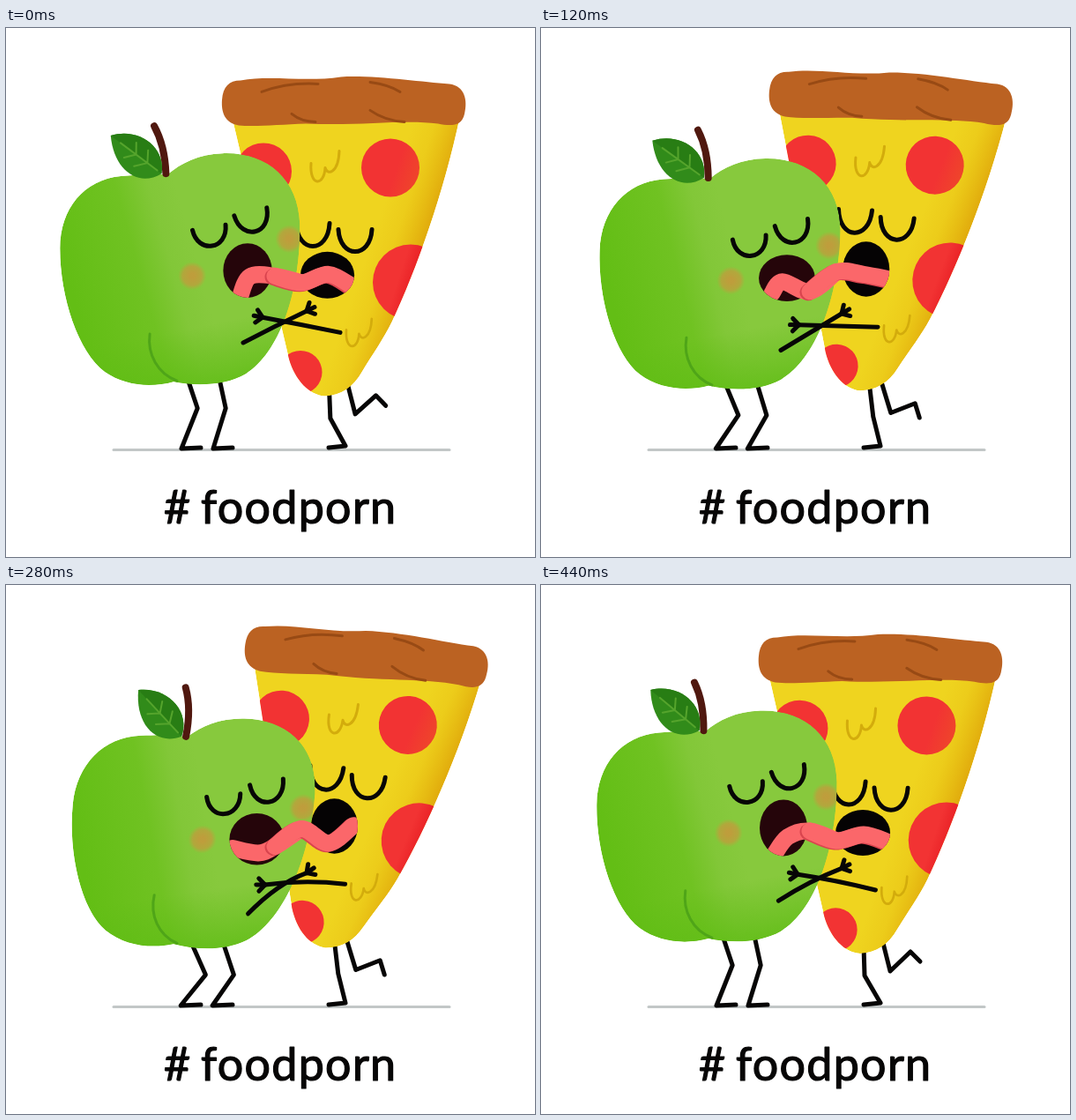
Recreate the animation shown at these times as an HTML page with a canvas. Size 600 by 600 pixels, loop 0.48 s.

```html
<!DOCTYPE html>
<html lang="en">
<head>
<meta charset="utf-8">
<title>Food hug</title>
<style>
  html, body { margin: 0; width: 100%; height: 100%; overflow: hidden; background: #fff; }
  canvas { display: block; }
</style>
</head>
<body>
<canvas id="stage" width="600" height="600"></canvas>
<script>
const ctx = document.getElementById('stage').getContext('2d');
const STEP_MS = 40, STEPS = 12;
const BLACK = '#070606', PINK = '#fb676a', FOLD = '#d9444e', RED = '#f23333';

let step = 0;

// Swings from 0 to 1 and back once per loop, reaching 1 at the given step.
const wave = peak => (1 + Math.cos((step - peak) / STEPS * 2 * Math.PI)) / 2;

const shapes = {
  apple: new Path2D('M183 166C165 165 150 166 130 168C88 172 61 205 61 250C61 305 82 368 112 390C135 406 165 408 190 401C215 406 248 406 272 392C310 368 334 300 333 222C331 170 295 140 245 142C218 143 198 153 183 166Z'),
  crease: new Path2D('M163 347C160 370 172 392 194 400'),
  stem: new Path2D('M0 0Q-1 -32 -13 -54'),
  leaf: new Path2D('M0 0C12 -29 46 -29 72 0C52 27 14 27 0 0Z'),
  leafHalf: new Path2D('M0 0C14 27 52 27 72 0Z'),
  veins: new Path2D('M6 0H58M20 0L28 12M20 0L30 -12M36 0L44 11M36 0L45 -11'),
  slice: new Path2D('M256 100L321 376C328 400 344 417 362 418C380 417 394 408 404 390C416 370 429 352 438 333C465 275 496 190 515 100Z'),
  crust: new Path2D('M266 60C300 54 340 62 380 56C420 54 470 62 503 64C520 66 524 82 520 98C517 112 505 112 490 109C450 104 400 112 340 109C310 110 282 113 264 111C248 108 244 96 245 82C246 67 253 60 266 60Z'),
  crustLines: new Path2D('M290 73Q320 62 354 64M413 62Q435 65 447 73M324 98Q335 107 351 107M413 94Q430 106 452 107'),
  squiggle: new Path2D('M0 0C-2 27 15 26 16 5C18 14 31 12 32 -14')
};

function stroke(path, color, width) {
  ctx.strokeStyle = color;
  ctx.lineWidth = width;
  ctx.stroke(path);
}

function fill(path, color) {
  ctx.fillStyle = color;
  ctx.fill(path);
}

function disc(x, y, rx, ry, color) {
  const path = new Path2D();
  path.ellipse(x, y, rx, ry, 0, 0, 7);
  fill(path, color);
}

function line(...coords) {
  const path = new Path2D();
  for (let i = 0; i < coords.length; i += 2) path.lineTo(coords[i], coords[i + 1]);
  stroke(path, BLACK, 5);
}

function layer(draw) {
  ctx.save();
  draw();
  ctx.restore();
}

function gradient(x0, y0, x1, y1, stops) {
  const g = ctx.createLinearGradient(x0, y0, x1, y1);
  stops.forEach(([at, color]) => g.addColorStop(at, color));
  return g;
}

function eye(x, y, depth, tilt) {
  layer(() => {
    ctx.translate(x, y);
    ctx.rotate(tilt);
    const d = depth / .75;
    stroke(new Path2D(`M-19 0C-17 ${d} 17 ${d} 19 0`), BLACK, 5);
  });
}

function cheek(x, y) {
  const g = ctx.createRadialGradient(x, y, 3, x, y, 16);
  g.addColorStop(0, 'rgba(200,150,60,.85)');
  g.addColorStop(.6, 'rgba(196,154,60,.7)');
  g.addColorStop(1, 'rgba(190,160,60,0)');
  disc(x, y, 16, 16, g);
}

// Smooth curve through [x, y] points.
function spline(points) {
  const path = new Path2D(), at = i => points[Math.max(0, Math.min(points.length - 1, i))];
  path.moveTo(...points[0]);
  for (let i = 0; i < points.length - 1; i++) {
    const a = at(i - 1), b = at(i), c = at(i + 1), d = at(i + 2);
    path.bezierCurveTo(b[0] + (c[0] - a[0]) / 6, b[1] + (c[1] - a[1]) / 6,
      c[0] - (d[0] - b[0]) / 6, c[1] - (d[1] - b[1]) / 6, ...c);
  }
  return path;
}

function drawLegs() {
  const u = wave(5.5), v = wave(5);
  for (const [hip, knee, foot] of [[206, 217, 199], [242, 249, 235]])
    line(hip + 5 * u, 398 + 9 * u, knee + 11 * u, 431 + 13 * u, foot - u, 477, foot + 22, 476);
  line(366 + 8 * v, 410 - 13 * v, 367 + 13 * v, 443 - 3 * v, 385, 474, 366, 476);
  line(387 - v, 402, 396 + v, 438 - 2 * v, 419 + 7 * v, 416 + 13 * v,
    430 + 16 * v * (1 - v) - 5 * v, 427 + 20 * v);
}

function drawPizza(mouth) {
  const eyeLift = -13 * wave(5);
  layer(() => {
    ctx.translate(360, 418 - 9 * wave(5));
    ctx.rotate(.083 * wave(6));
    ctx.translate(-360, -418);
    layer(() => {
      ctx.clip(shapes.slice);
      fill(shapes.slice, '#efd41f');
      for (const [x, y, r] of [[292, 163, 32], [436, 159, 33], [334, 391, 24.5]])
        disc(x, y, r, r, RED);
      fill(shapes.slice, gradient(420, 226, 478, 246,
        [[0, 'rgba(222,160,0,0)'], [.4, 'rgba(222,160,0,.15)'], [1, 'rgba(214,140,0,.65)']]));
      disc(459, 289, 43, 43, gradient(425, 280, 474, 296, [[0, RED], [.4, RED], [1, '#e2121b']]));
    });
    for (const [x, y, scale] of [[346, 154, 1], [386, 343, .9]]) layer(() => {
      ctx.translate(x, y);
      ctx.scale(scale, scale);
      stroke(shapes.squiggle, '#d3ac0c', 3);
    });
    fill(shapes.crust, '#bb6222');
    stroke(shapes.crustLines, '#984a14', 3);
    eye(348, 223 + eyeLift, 26, 0);
    eye(396, 230 + eyeLift, 25, 0);
  });
  disc(...mouth, '#050304');
}

function drawApple(mouth) {
  const skew = .1 * wave(6.5), drop = 8 * wave(5.5), eyeDrop = 8 * wave(4.5);
  layer(() => {
    ctx.transform(1, .6 * skew, -skew, 1, 400 * skew, drop - 120 * skew);
    layer(() => {
      ctx.clip(shapes.apple);
      fill(shapes.apple, gradient(75, 300, 215, 260,
        [[0, '#63be15'], [.55, '#70c222'], [.8, '#82c738'], [1, '#87c93d']]));
      fill(shapes.apple, gradient(235, 335, 250, 408, [[0, 'rgba(94,188,20,0)'], [1, 'rgba(94,188,20,.85)']]));
      cheek(211, 281);
      cheek(321, 239);
    });
    stroke(shapes.crease, '#4fa518', 3);
    eye(230, 225 + eyeDrop, 21, -.16);
    eye(277, 207 + eyeDrop, 23, -.24);
  });
  layer(() => {
    ctx.translate(181 + 235 * skew, 165 + drop);
    layer(() => {
      ctx.rotate(.26 * wave(7.2) - .03);
      stroke(shapes.stem, '#50180f', 8);
    });
    ctx.translate(-5, 0);
    ctx.rotate(Math.PI + .6 + .23 * wave(7.7));
    fill(shapes.leaf, '#318b1a');
    fill(shapes.leafHalf, '#287d14');
    stroke(shapes.veins, '#55a42c', 2);
  });
  disc(...mouth, '#25050a');
}

function drawTongues(a, p) {
  // x, highest y, travel, step of the lowest position
  const points = [
    [257, 297, 10, 11.5], [280, 281, 23, 6.8], [305, 279, 25, 4.8],
    [335, 272, 18, 11], [366, 277, 16, 7.5], [394, 272, 22, .3]
  ].map(([x, y, travel, peak]) => [x, y + travel * wave(peak)]);
  points[0][0] += 8 * wave(.5);
  points[1][0] += 14 * wave(8) - 7;

  layer(() => {
    const mask = new Path2D();
    mask.ellipse(...a, 0, 0, 2 * Math.PI);
    mask.closePath();
    mask.rect(a[0] + 8, 230, p[0] - a[0] - 8, 110);
    mask.moveTo(p[0] + p[2], p[1]);
    mask.ellipse(...p, 0, 0, 2 * Math.PI);
    ctx.clip(mask);
    const back = spline(points.slice(0, 4)), front = spline(points.slice(2));
    stroke(back, PINK, 19);
    layer(() => {
      ctx.translate(-2, 1);
      stroke(front, FOLD, 19);
    });
    stroke(front, PINK, 19);
  });
}

function drawArm(x, y, wx, wy, bend = 0) {
  stroke(new Path2D(`M${x} ${y}Q${(x + wx) / 2} ${(y + wy) / 2 - 2 * bend} ${wx} ${wy}`), BLACK, 5);
  const angle = Math.atan2(wy - y, wx - x);
  for (const spread of [-.8, 0, .8])
    line(wx, wy, wx + 10 * Math.cos(angle + spread), wy + 10 * Math.sin(angle + spread));
}

function drawArms() {
  const lean = wave(6), bend = 9 * wave(8.5) ** 3;
  drawArm(269 + 6 * lean, 357 + 17 * lean, 341, 321 + 6 * lean, bend);
  drawArm(379 + 6 * lean, 346 - 9 * wave(5), 291 + 3 * lean, 328 + 14 * wave(5.5), bend / 2);
}

function drawCaption() {
  ctx.font = '52px Lato, sans-serif';
  ctx.fillStyle = ctx.strokeStyle = BLACK;
  ctx.lineWidth = 1.2;
  ctx.letterSpacing = '1.3px';
  for (const [text, x] of [['#', 179], ['foodporn', 221]]) {
    ctx.fillText(text, x, 561.5);
    ctx.strokeText(text, x, 561.5);
  }
}

function render(now) {
  step = Math.floor(now / STEP_MS) % STEPS;
  const appleMouth = [274 + 11 * wave(6.2), 275 + 15 * wave(5.7), 27 + 6 * wave(4.7), 32.5 - 6.5 * wave(4)];
  const open = wave(5);
  const pizzaMouth = [364.5 + 8.5 * wave(6), 281 - 10 * open, 31 - 6 * open, 26 + 7 * open];

  ctx.fillStyle = '#fff';
  ctx.fillRect(0, 0, 600, 600);
  ctx.lineCap = ctx.lineJoin = 'round';
  stroke(new Path2D('M122 478.5H503'), '#c2c7c7', 3);
  drawCaption();
  drawLegs();
  drawPizza(pizzaMouth);
  drawApple(appleMouth);
  drawTongues(appleMouth, pizzaMouth);
  drawArms();
}

function loop() {
  render(performance.now());
  requestAnimationFrame(loop);
}
loop();
</script>
</body>
</html>
```
